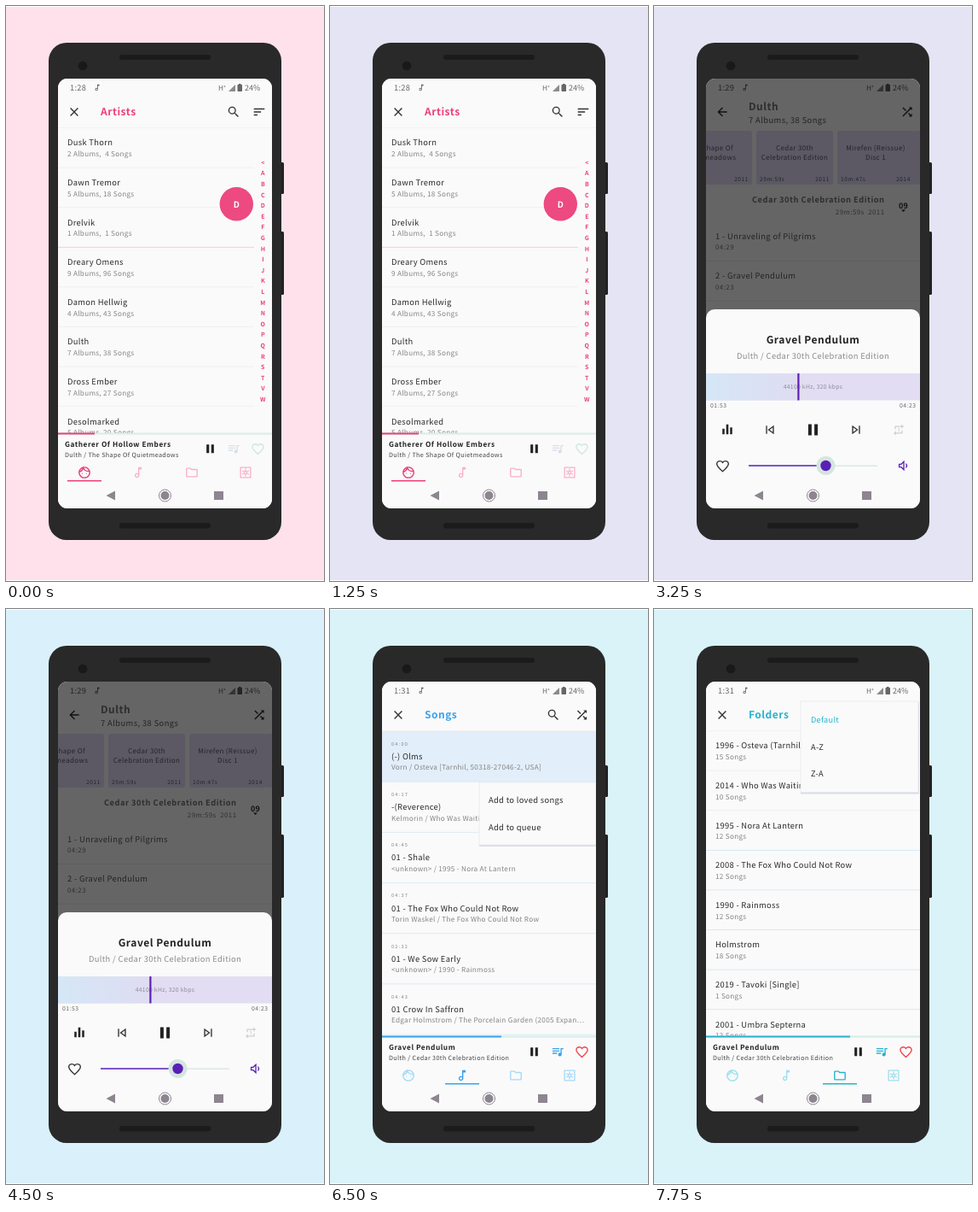
Animation, 373 px wide and 673 px high, one loop 8 s. Source, as an HTML page:

```html
<!DOCTYPE html>
<html lang="en">
<head>
<meta charset="utf-8">
<title>Music player themes</title>
<style>
html, body { margin: 0; width: 100%; height: 100%; overflow: hidden; background: #fff; }
svg { display: block; width: 373px; height: 673px; text-rendering: geometricPrecision;
  font-family: "Noto Sans CJK JP", "Noto Sans CJK SC", "Noto Sans CJK", "Noto Sans", sans-serif; }
text { white-space: pre; }
</style>
</head>
<body>
<svg id="stage" viewBox="0 0 373 673"></svg>
<script>
const LOOP = 8000;
const DARK = '#2b2b2b', GREY = '#858585', PAPER = '#fafafa';
const PINK = { main: '#ec3f7a', soft: '#fbb0c9', track: '#d9eee4', played: 104, queue: '#d9dfe8', heart: '#cfe8da' };
const BLUE = { main: '#38a3ee', soft: '#a5d9f8', track: '#d3eee6', played: 201, queue: '#38a3ee', heart: '#f0424a' };
const CYAN = { main: '#27b3cd', soft: '#9fdfec', track: '#d3eee6', played: 230, queue: '#27b3cd', heart: '#f0424a' };
const PURPLE = '#5a20b5';

const rect = (x, y, w, h, fill, extra = '') =>
  `<rect x="${x}" y="${y}" width="${w}" height="${h}" fill="${fill}" ${extra}/>`;
const circle = (x, y, r, fill, extra = '') => `<circle cx="${x}" cy="${y}" r="${r}" fill="${fill}" ${extra}/>`;
const label = (s, x, y, size, fill, { ls = .3, weight = 400, anchor = 'start' } = {}) =>
  `<text x="${x}" y="${y}" font-size="${size}" fill="${fill}" letter-spacing="${ls}" font-weight="${weight}" text-anchor="${anchor}">${
    s.replace(/</g, '&lt;')}</text>`;

// Icons live on a 24-unit grid centred on (x, y).
const ICONS = {
  close: 'M19 6.4 17.6 5 12 10.6 6.4 5 5 6.4 10.6 12 5 17.6 6.4 19 12 13.4 17.6 19 19 17.6 13.4 12z',
  search: 'M15.5 14h-.8l-.3-.3A6.5 6.5 0 1 0 13.7 14.4l.3.3v.8l5 5L20.5 19zm-6 0a4.5 4.5 0 1 1 0-9 4.5 4.5 0 0 1 0 9z',
  sort: 'M3 18h6v-2H3zM3 6v2h18V6zM3 13h12v-2H3z',
  shuffle: 'M10.6 9.2 5.4 4 4 5.4l5.2 5.2zM14.5 4l2 2L4 18.6 5.4 20 18 7.5l2 2V4zm.3 9.4-1.4 1.4 3.1 3.1L14.5 20H20v-5.5l-2 2z',
  back: 'M20 11H7.8l5.6-5.6L12 4l-8 8 8 8 1.4-1.4L7.8 13H20z',
  queue: 'M15 6H3v2h12zM15 10H3v2h12zM3 16h8v-2H3zM17 6v8.2A3 3 0 1 0 19 17V8h3V6z',
  note: 'M12 3v10.5A4 4 0 1 0 14 17V7h4V3zM10 19a2 2 0 1 1 0-4 2 2 0 0 1 0 4z',
  folder: 'M9.2 6l2 2H20v10H4V6zM10 4H4a2 2 0 0 0-2 2v12a2 2 0 0 0 2 2h16a2 2 0 0 0 2-2V8a2 2 0 0 0-2-2h-8z',
  pause: 'M5 4h5v16H5zM14 4h5v16h-5z',
  bars: 'M4 11h3.5v9H4zM10.2 4h3.6v16h-3.6zM16.5 9H20v11h-3.5z',
  repeat: 'M7 7h10v3l4-4-4-4v3H5v6h2zM17 17H7v-3l-4 4 4 4v-3h12v-6h-2zM11 9h2v6h-1.3v-4.5H11z',
};
const LINE_ICONS = {
  heart: 'M12 20.4C5.6 14.8 2.8 12 2.8 8.6 2.8 6 5 4 7.5 4c1.7 0 3.4.8 4.5 2.3C13.1 4.8 14.8 4 16.5 4 19 4 21.2 6 21.2 8.6c0 3.4-2.8 6.2-9.2 11.8z',
  face: 'M12 3a9 9 0 1 0 .01 0zM3.5 11C7 10 9 7.5 10 4c2 4.5 6 6.500 10.500 5.500M8.500 13v1M15.500 13v1',
  settings: 'M3.500 3.500h17v17h-17zM12 9.500a2.500 2.500 0 1 0 .01 0zM12 5.500v2.500M12 16v2.500M6.400 8.800l2.200 1.200M15.400 14l2.200 1.200M6.400 15.200l2.200-1.200M15.400 10l2.200-1.200',
  prev: 'M6.500 5.500v13M17.500 6.500v11L10 12z',
  next: 'M17.500 5.500v13M6.500 6.500v11L14 12z',
  volume: 'M4 9.500v5h3.500l4.500 4.500V5L7.500 9.500zM15.500 8.500c2 2 2 5 0 7',
};
const icon = (name, x, y, color, scale = .7) => {
  const paint = ICONS[name] ? `fill="${color}" fill-rule="evenodd"` : `fill="none" stroke="${color}" stroke-width="1.9"`;
  return `<path transform="translate(${x} ${y}) scale(${scale}) translate(-12 -12)" ${paint} d="${ICONS[name] || LINE_ICONS[name]}"/>`;
};

const status = (time, color) =>
  label(time, 75, 99.3, 9.3, color) + icon('note', 107, 95.5, color, .42) +
  label('H⁺', 249, 99.3, 8.3, color, { ls: 0 }) +
  `<path d="M261 100h8v-8z" fill="${color}" opacity=".75"/>` +
  rect(271.5, 92, 5.5, 8, color, 'rx=".7"') + rect(273, 91, 2.500, 1, color) +
  label('24%', 280, 99.3, 9, color, { ls: 0 });

const navBar = () =>
  '<path d="M128 567.500v11L117.500 573z" fill="#8d8590"/>' +
  circle(186.500, 573, 7, 'none', 'stroke="#8d8590"') + circle(186.500, 573, 5, '#8d8590') +
  rect(244, 568, 11, 10, '#8d8590');

const header = (title, theme, icons) =>
  rect(61, 85, 251, 57.500, PAPER) + icon('close', 80, 124, '#333') +
  label(title, 111, 128.300, 12, theme.main, { ls: .5, weight: 900 }) +
  icons.map(([name, x]) => icon(name, x, 124, '#333')).join('') + rect(61, 142, 251, 1, '#f2f2f2');

const footer = (title, sub, theme, tab) => {
  const tabs = ['face', 'note', 'folder', 'settings'];
  return rect(61, 500, 251, 88, PAPER) + rect(61, 499.500, 251, 2, theme.track) +
    rect(61, 499.500, theme.played - 61, 2, theme.main) +
    label(title, 69, 515.800, 8.300, '#222', { ls: .53, weight: 700 }) +
    label(sub, 69, 527.800, 7.200, '#444', { ls: .37 }) +
    icon('pause', 239.500, 518.300, '#222', .62) + icon('queue', 267, 518, theme.queue, .68) +
    icon('heart', 295.500, 518.500, theme.heart, .72) +
    tabs.map((name, i) => icon(name, 92 + 63 * i, 546, i === tab ? theme.main : theme.soft, .69)).join('') +
    rect(72 + 63 * tab, 555, 40, 1.500, theme.main);
};

const rows = (items, right, line) => items.map(([title, sub], i) => {
  const y = 163.300 + i * 46.600;
  return label(title, 72, y, 9.400, DARK) + label(sub, 72, y + 12.800, 8.200, GREY, { ls: .28 }) +
    rect(61, y + 25.400, right - 61, .8, line(i));
}).join('');

const popup = (x, y, w, h) =>
  rect(x, y + 1, w + 1, h + 1, '#dcdde8') + rect(x, y, w, h, PAPER, 'stroke="#e3e4ee" stroke-width=".7"');

function artists() {
  const list = [
    ['Dusk Thorn', '2 Albums,  4 Songs'], ['Dawn Tremor', '5 Albums, 18 Songs'],
    ['Drelvik', '1 Albums,  1 Songs'], ['Dreary Omens', '9 Albums, 96 Songs'],
    ['Damon Hellwig', '4 Albums, 43 Songs'], ['Dulth', '7 Albums, 38 Songs'],
    ['Dross Ember', '7 Albums, 27 Songs'], ['Desolmarked', '5 Albums, 20 Songs']];
  const letters = [...'<ABCDEFGHIJKLMNOPQRSTVW'];
  return header('Artists', PINK, [['search', 267], ['sort', 297]]) +
    rows(list, 291, i => i === 2 ? '#fbbfd4' : '#eeeeee') +
    letters.map((c, i) => label(c, 301.300, 185.700 + i * 12.600, 7, PINK.main, { ls: 0, weight: 900, anchor: 'middle' })).join('') +
    circle(270.300, 231.700, 19.700, '#ec4a80') +
    label('D', 270.300, 235.500, 10, '#fff', { ls: 0, weight: 900, anchor: 'middle' }) +
    footer('Gatherer Of Hollow Embers', 'Dulth / The Shape Of Quietmeadows', PINK, 0) +
    status('1:28', '#666') + navBar();
}

function player() {
  const ink = '#242424', faint = '#303030', mid = { anchor: 'middle' };
  const card = (x, w, lines, length, year) =>
    rect(x, 146, w, 63, '#5c5965', 'rx="3"') +
    lines.map((s, i) => label(s, x + w / 2, 168.500 + i * 11.800, 8, ink, { ...mid, ls: .35 })).join('') +
    label(length, x + 4, 205, 6.500, ink, { ls: .6 }) +
    label(year, x + w - 4, 205, 6.500, ink, { ls: .6, anchor: 'end' });
  const track = (title, time, y) => label(title, 72, y, 9.400, ink, { ls: .35, weight: 500 }) +
    label(time, 72, y + 12.800, 7.800, faint, { ls: .5 }) + rect(61, y + 25.500, 251, .8, '#5c5c5c');
  return rect(61, 85, 251, 503, '#656565') + status('1:29', ink) +
    icon('back', 80, 124, '#111') + icon('shuffle', 297, 124, '#111') +
    label('Dulth', 111, 121.500, 12, '#2e2e2e', { ls: .5, weight: 900 }) +
    label('7 Albums, 38 Songs', 111, 137, 9.400, ink, { ls: .4 }) +
    card(17, 98, ['The Shape Of', 'Quietmeadows'], '', '2011') +
    card(120, 90, ['Cedar 30th', 'Celebration Edition'], '29m:59s', '2011') +
    card(215, 90, ['Mirefen (Reissue)', 'Disc 1'], '10m:47s', '2014') +
    rect(305, 146, 7, 63, '#5c5965') +
    label('Cedar 30th Celebration Edition', 270.500, 230.300, 9.300, '#2e2e2e', { ls: .5, weight: 700, anchor: 'end' }) +
    label('29m:59s  2011', 270.500, 243.500, 7.800, faint, { ls: .5, anchor: 'end' }) +
    label('09', 292.500, 237, 9, '#111', { ...mid, weight: 700 }) +
    '<path d="M290 238.500h5l-2.500 2.500z" fill="#111"/>' +
    track('1 - Unraveling of Pilgrims', '04:29', 272.600) + track('2 - Gravel Pendulum', '04:23', 319.200) +
    `<path d="M61 588V365a10 10 0 0 1 10-10H302a10 10 0 0 1 10 10V588z" fill="${PAPER}"/>` +
    label('Gravel Pendulum', 186.500, 394.800, 12, '#222', { ...mid, ls: .53, weight: 700 }) +
    label('Dulth / Cedar 30th Celebration Edition', 186.500, 413, 9.400, '#8b8b8b', { ...mid, ls: .35 }) +
    rect(61, 430, 251, 31.500, '#e2ddf2') + rect(61, 430, 108, 31.500, 'url(#seek)') +
    label('44100 kHz, 320 kbps', 186.500, 448.300, 6.800, '#8f8a99', { ...mid, ls: .3 }) +
    rect(168.300, 430, 2.200, 31.500, PURPLE) +
    label('01:53', 66, 469.500, 6.800, '#666', { ls: .5 }) + label('04:23', 307.500, 469.500, 6.800, '#666', { ls: .5, anchor: 'end' }) +
    icon('bars', 86, 495.500, '#222', .72) + icon('prev', 136, 496, '#333', .72) +
    icon('pause', 186.500, 496, '#222', .8) + icon('next', 237, 496, '#333', .72) +
    icon('repeat', 287, 496, '#cfcfcf', .66) + icon('heart', 80.500, 538.500, '#333', .74) +
    rect(111, 537.500, 151, 1.500, '#d7ebe2') + rect(111, 537, 90, 2, '#7d55c7') +
    circle(201.500, 538, 11, '#d4e6e0') + circle(201.500, 538, 6.200, PURPLE) +
    icon('volume', 293, 538, PURPLE, .68) + navBar();
}

function songs() {
  const list = [
    ['04:00', '(-) Olms', 'Vorn / Osteva [Tarnhil, 50318-27046-2, USA]'],
    ['04:17', '-(Reverence)', 'Kelmorin / Who Was Waiting'],
    ['04:45', '01 - Shale', '<unknown> / 1995 - Nora At Lantern'],
    ['04:37', '01 - The Fox Who Could Not Row', 'Torin Waskel / The Fox Who Could Not Row'],
    ['02:32', '01 - We Sow Early', '<unknown> / 1990 - Rainmoss'],
    ['04:43', '01 Crow In Saffron', 'Edgar Holmstrom / The Porcelain Garden (2005 Expan…']];
  return header('Songs', BLUE, [['search', 262], ['shuffle', 295.500]]) +
    rect(61, 143, 251, 59, '#e2eefa') +
    list.map(([time, title, sub], i) => {
      const y = 159.700 + i * 59.200;
      return label(time, 72, y, 5.600, GREY, { ls: 1.250 }) + label(title, 72, y + 16.200, 9.400, DARK) +
        label(sub, 72, y + 28.600, 8.200, GREY, { ls: .28 }) + rect(61, y + 42, 251, .8, '#d5e7f5');
    }).join('') +
    popup(175, 203, 137, 73) + label('Add to loved songs', 186, 227, 9.400, DARK) +
    label('Add to queue', 186, 258.700, 9.400, DARK) +
    footer('Gravel Pendulum', 'Dulth / Cedar 30th Celebration Edition', BLUE, 1) +
    status('1:31', '#666') + navBar();
}

function folders() {
  const list = [
    ['1996 - Osteva (Tarnhil)', '15 Songs'], ['2014 - Who Was Waiting', '10 Songs'],
    ['1995 - Nora At Lantern', '12 Songs'], ['2008 - The Fox Who Could Not Row', '12 Songs'],
    ['1990 - Rainmoss', '12 Songs'], ['Holmstrom', '18 Songs'],
    ['2019 - Tavoki [Single]', '1 Songs'], ['2001 - Umbra Septerna', '13 Songs']];
  return header('Folders', CYAN, []) + rows(list, 312, i => i > 1 ? '#cde6f4' : '#e9eef2') +
    popup(172, 108, 138, 106.500) +
    ['Default', 'A-Z', 'Z-A'].map((s, i) => label(s, 184, 132.800 + i * 31.800, 9.200, i ? DARK : CYAN.main)).join('') +
    footer('Gravel Pendulum', 'Dulth / Cedar 30th Celebration Edition', CYAN, 2) +
    status('1:31', '#666') + navBar();
}

const SCREENS = [[0, artists], [2750, player], [4750, songs], [7000, folders]];
const BACKDROPS = [[0, '#ffe1eb'], [1250, '#e4e4f4'], [3500, '#daf1fc'], [5750, '#d9f3f9']];

const stage = document.getElementById('stage');
stage.innerHTML =
  `<defs><clipPath id="glass">${rect(61, 85, 251, 503, '#fff', 'rx="11"')}</clipPath>
  <linearGradient id="seek"><stop stop-color="#d5e7f6"/><stop offset="1" stop-color="#dfdcf2"/></linearGradient></defs>` +
  rect(0, 1, 373, 671, '#fff', 'id="backdrop"') +
  rect(318, 183, 8, 37, '#222', 'rx="1.500"') + rect(318, 264, 8, 74, '#222', 'rx="1.500"') +
  rect(50, 43, 273, 582, '#292929', 'rx="21"') +
  rect(133, 57, 107, 6, '#1b1b1b', 'rx="3"') + rect(133, 605, 107, 6.500, '#1b1b1b', 'rx="3"') +
  circle(90, 70, 5.300, '#191919') +
  `<g clip-path="url(#glass)">${rect(61, 85, 251, 503, PAPER)}${
    SCREENS.map(([, draw]) => `<g class="screen">${draw()}</g>`).join('')}</g>`;

const backdrop = document.getElementById('backdrop');
const layers = document.querySelectorAll('.screen');
const current = (steps, t) => steps.findLastIndex(([start]) => t >= start);

function frame() {
  const t = performance.now() % LOOP;
  const shown = current(SCREENS, t);
  layers.forEach((layer, i) => { layer.style.display = i === shown ? '' : 'none'; });
  backdrop.setAttribute('fill', BACKDROPS[current(BACKDROPS, t)][1]);
  requestAnimationFrame(frame);
}
frame();
</script>
</body>
</html>
```
